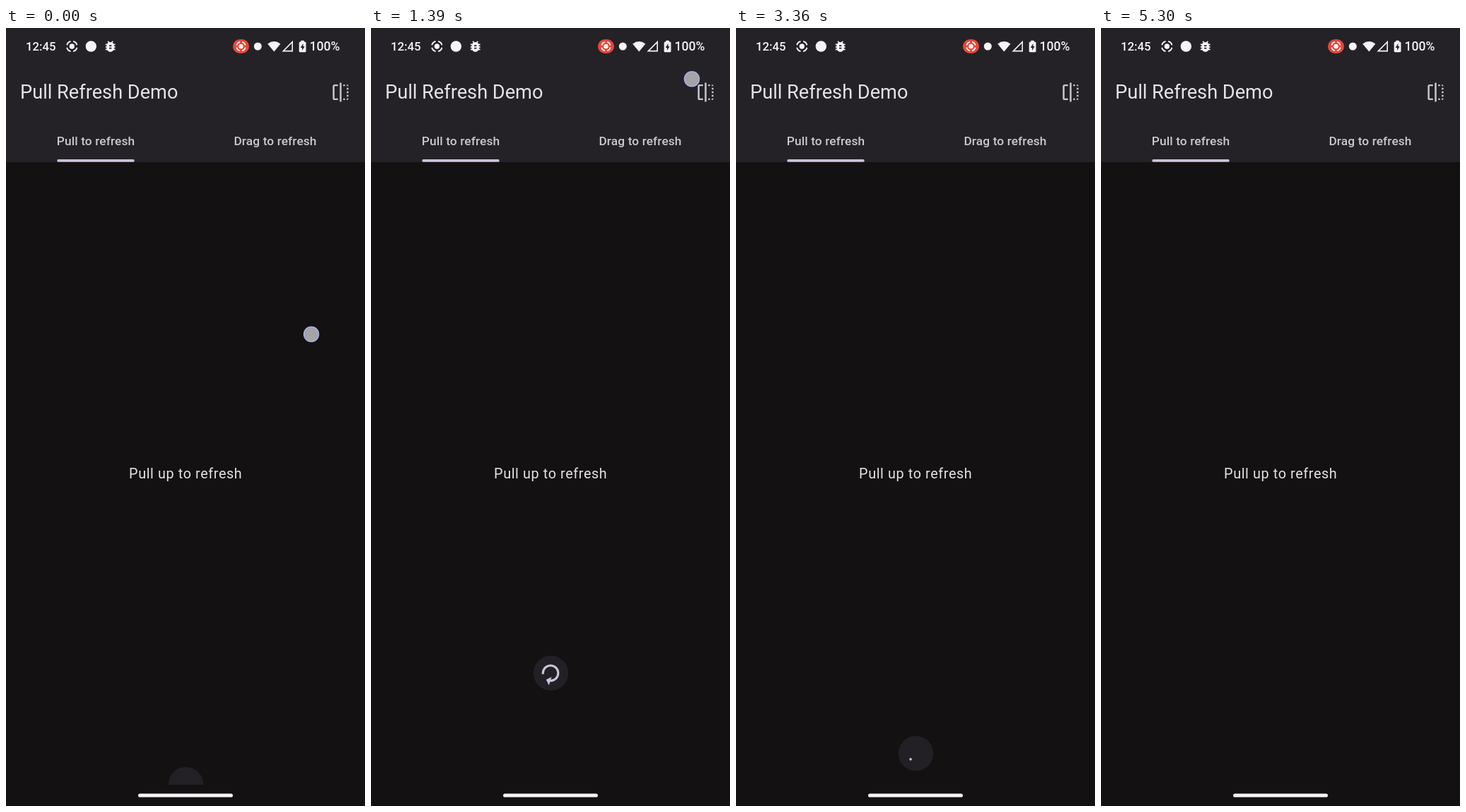
An HTML page with a canvas that plays this animation: 508x1102 px, repeating every 5330 ms.

```html
<!DOCTYPE html>
<html lang="en">
<head>
<meta charset="utf-8">
<title>Pull Refresh Demo</title>
<style>
html, body { margin: 0; width: 100%; height: 100%; overflow: hidden; background: #131112; }
canvas { display: block; width: 508px; height: 1102px; }
</style>
</head>
<body>
<canvas id="stage"></canvas>
<script>
const W = 508, H = 1102, LOOP = 5330, DP = 1.236;
const canvas = document.getElementById('stage');
const ctx = canvas.getContext('2d');
const ratio = window.devicePixelRatio || 1;
canvas.width = W * ratio;
canvas.height = H * ratio;

const BG = '#131112', BAR = '#242226', DISC = '#222024';
const LILAC = '#cdc2da', WHITE = '#f6f4f6';

// Gesture and refresh timing in ms
const SETTLE = 1700, RELEASE = 2046, DONE = 5046;
const THRESHOLD = 80 * DP, REST = 56 * DP;
const EDGE = 1072, CX = 254.5, DISC_R = 20 * DP;
const ARC_R = 8.75 * DP, STROKE = 2.5 * DP;

const clamp = (v, a, b) => Math.min(b, Math.max(a, v));
const rad = deg => deg * Math.PI / 180;

function bezier(x1, y1, x2, y2) {
  const at = (a, b, s) => 3 * a * s * (1 - s) ** 2 + 3 * b * s * s * (1 - s) + s ** 3;
  return x => {
    if (x <= 0) return 0;
    if (x >= 1) return 1;
    let lo = 0, hi = 1;
    for (let i = 0; i < 24; i++) {
      const mid = (lo + hi) / 2;
      if (at(x1, x2, mid) < x) lo = mid; else hi = mid;
    }
    return at(y1, y2, lo);
  };
}
const ease = bezier(0.4, 0, 0.2, 1);

// Critically damped spring, 1 -> 0
function spring(ms) {
  const k = Math.sqrt(1500) * ms / 1000;
  return (1 + k) * Math.exp(-k);
}

function drag(t) {
  const d = 369.5 * (1 - (1 - clamp(t / SETTLE, 0, 1)) ** 2.286);
  return {
    x: 432 + 0.0339 * d + 7.43e-5 * d * d,
    y: 434.3 - d,
    pull: 25 + 0.578 * d - 1.08e-4 * d * d
  };
}

function tension(pull) {
  const over = clamp(pull / THRESHOLD - 1, 0, 2);
  return over - over * over / 4;
}

function pulledOffset(pull) {
  return Math.min(pull, THRESHOLD) + THRESHOLD * tension(pull);
}

// Moment the pull passes the threshold
let armed = 0;
while (drag(armed).pull < THRESHOLD) armed++;

function discOffset(t) {
  if (t < RELEASE) return pulledOffset(drag(t).pull);
  if (t < DONE) return REST + (pulledOffset(drag(RELEASE).pull) - REST) * spring(t - RELEASE);
  return REST * spring(t - DONE);
}

function circle(x, y, r, fill) {
  ctx.fillStyle = fill;
  ctx.beginPath();
  ctx.arc(x, y, r, 0, 7);
  ctx.fill();
}

function arc(from, sweep) {
  ctx.beginPath();
  ctx.arc(0, 0, ARC_R, rad(from), rad(from + sweep));
  ctx.stroke();
}

function pill(x, y, w, h, r, fill) {
  ctx.fillStyle = fill;
  ctx.beginPath();
  ctx.roundRect(x, y, w, h, r);
  ctx.fill();
}

function poly(points, fill) {
  ctx.fillStyle = fill;
  ctx.beginPath();
  points.forEach(([x, y]) => ctx.lineTo(x, y));
  ctx.closePath();
  ctx.fill();
}

function text(str, x, y, size, fill, { weight = 400, align = 'left', space = 0 } = {}) {
  ctx.font = `${weight} ${size}px Roboto, sans-serif`;
  ctx.letterSpacing = space + 'px';
  ctx.textAlign = align;
  ctx.fillStyle = fill;
  ctx.fillText(str, x, y);
}

const BUG = new Path2D('M20 8h-2.81c-.45-.78-1.07-1.45-1.82-1.96L17 4.41 15.59 3l-2.17 2.17C12.96 5.06 12.49 5 12 5c-.49 0-.96.06-1.41.17L8.41 3 7 4.41l1.62 1.63C7.88 6.55 7.26 7.22 6.81 8H4v2h2.09c-.05.33-.09.66-.09 1v1H4v2h2v1c0 .34.04.67.09 1H4v2h2.81c1.04 1.79 2.97 3 5.19 3s4.15-1.21 5.19-3H20v-2h-2.09c.05-.33.09-.66.09-1v-1h2v-2h-2v-1c0-.34-.04-.67-.09-1H20V8zm-6 8h-4v-2h4v2zm0-4h-4v-2h4v2z');
const FLIP = new Path2D('M15 21h2v-2h-2v2zm4-12h2V7h-2v2zM3 5v14c0 1.1.9 2 2 2h4v-2H5V5h4V3H5c-1.1 0-2 .9-2 2zm16-2v2h2c0-1.1-.9-2-2-2zm-8 20h2V1h-2v22zm8-6h2v-2h-2v2zM15 5h2V3h-2v2zm4 8h2v-2h-2v2zm0 8c1.1 0 2-.9 2-2h-2v2z');

function icon(path, x, y, scale, fill) {
  ctx.save();
  ctx.translate(x, y);
  ctx.scale(scale, scale);
  ctx.translate(-12, -12);
  ctx.fillStyle = fill;
  ctx.fill(path);
  ctx.restore();
}

function recordIcon(x, y, r) {
  circle(x, y, r * 0.46, WHITE);
  ctx.strokeStyle = WHITE;
  ctx.lineWidth = r * 0.24;
  ctx.lineCap = 'butt';
  for (let i = 0; i < 4; i++) {
    ctx.beginPath();
    ctx.arc(x, y, r * 0.92, rad(i * 90 + 14), rad(i * 90 + 76));
    ctx.stroke();
  }
}

function statusBar() {
  text('12:45', 28, 31.8, 16.8, WHITE, { weight: 500 });
  recordIcon(93.3, 26, 8);
  circle(120.3, 26, 7.7, WHITE);
  icon(BUG, 147.7, 26, 0.86, WHITE);

  pill(321, 16, 23, 20, 10, '#e5473a');
  recordIcon(332.5, 26, 7);
  circle(356.3, 26, 5.5, WHITE);

  ctx.fillStyle = WHITE;
  ctx.beginPath();
  ctx.moveTo(379.3, 33.5);
  ctx.lineTo(370.2, 22.4);
  ctx.quadraticCurveTo(379.3, 15.8, 388.4, 22.4);
  ctx.fill();

  ctx.strokeStyle = WHITE;
  ctx.lineWidth = 1.6;
  ctx.beginPath();
  ctx.moveTo(392.3, 32.6);
  ctx.lineTo(405.2, 32.6);
  ctx.lineTo(405.2, 19.7);
  ctx.closePath();
  ctx.stroke();

  pill(414.7, 19.5, 9.8, 14.8, 1.5, WHITE);
  pill(417.4, 17.8, 4.4, 3, 0.5, WHITE);
  poly([[420.4, 21.8], [416.8, 28], [419, 28], [419, 32], [422.6, 26], [420.4, 26]], BAR);
  text('100%', 429.5, 31.8, 17.6, WHITE, { weight: 500 });
}

function appBar() {
  ctx.fillStyle = BAR;
  ctx.fillRect(0, 0, W, 190);
  statusBar();
  text('Pull Refresh Demo', 20, 100, 22 * DP, '#e7e2e7');
  icon(FLIP, 473.5, 91, DP, '#cbc6cf');
  const tab = { weight: 500, align: 'center', space: 0.1 * DP };
  text('Pull to refresh', 127, 166, 14 * DP, '#cdc6d2', tab);
  text('Drag to refresh', 381, 166, 14 * DP, '#cdc6d2', tab);
  pill(72.3, 186, 109.4, 3.8, 1.9, LILAC);
}

function arrow(t) {
  const { pull } = drag(t);
  const grow = Math.max(Math.min(1, pull / THRESHOLD) - 0.4, 0) * 5 / 3;
  if (!grow) return;
  const start = (-0.25 + 0.4 * grow + tension(pull)) * 180;
  const sweep = grow * 0.8 * 360;
  const half = 5 * DP * grow;

  ctx.globalAlpha = 0.3 + 0.7 * ease((t - armed) / 300);
  ctx.lineCap = 'square';
  arc(start, sweep);
  ctx.rotate(rad(start + sweep));
  poly([[ARC_R - half, -STROKE], [ARC_R + half, -STROKE], [ARC_R, half - STROKE]], LILAC);
}

function spinner(t) {
  const age = t - RELEASE, turn = 1332;
  const phase = age % turn;
  const head = 290 * ease(phase / 666);
  const tail = 290 * ease((phase - 666) / 666);
  const base = -90 + Math.floor(age / turn) * 216 + 286 * phase / turn;

  ctx.globalAlpha = Math.min(ease(age / 100), 1 - ease((t - DONE) / 100));
  ctx.lineCap = 'square';
  arc(base + tail + 8, Math.max(head - tail, 0.1));
}

function indicator(t) {
  ctx.save();
  ctx.beginPath();
  ctx.rect(0, 190, W, EDGE - 190);
  ctx.clip();
  ctx.translate(CX, EDGE + DISC_R - discOffset(t));
  circle(0, 0, DISC_R, DISC);
  ctx.translate(-0.4, 0);
  ctx.strokeStyle = LILAC;
  ctx.lineWidth = STROKE;
  if (t < RELEASE) arrow(t); else spinner(t);
  ctx.restore();
}

function pointer(t) {
  if (t >= RELEASE) return;
  const { x, y } = drag(t);
  circle(x, y, 10.6, '#a6a3a7');
  ctx.strokeStyle = '#a9b2ea';
  ctx.lineWidth = 1.3;
  ctx.stroke();
}

function draw(t) {
  ctx.setTransform(ratio, 0, 0, ratio, 0, 0);
  ctx.fillStyle = BG;
  ctx.fillRect(0, 0, W, H);
  appBar();
  text('Pull up to refresh', 254.2, 638, 16 * DP, '#e6e1e5', { align: 'center', space: 0.5 * DP });
  indicator(t);
  pill(187, 1084.4, 134, 5.2, 2.6, WHITE);
  pointer(t);
}

const begin = performance.now();
function tick() {
  draw((performance.now() - begin) % LOOP);
  requestAnimationFrame(tick);
}
tick();
</script>
</body>
</html>
```
